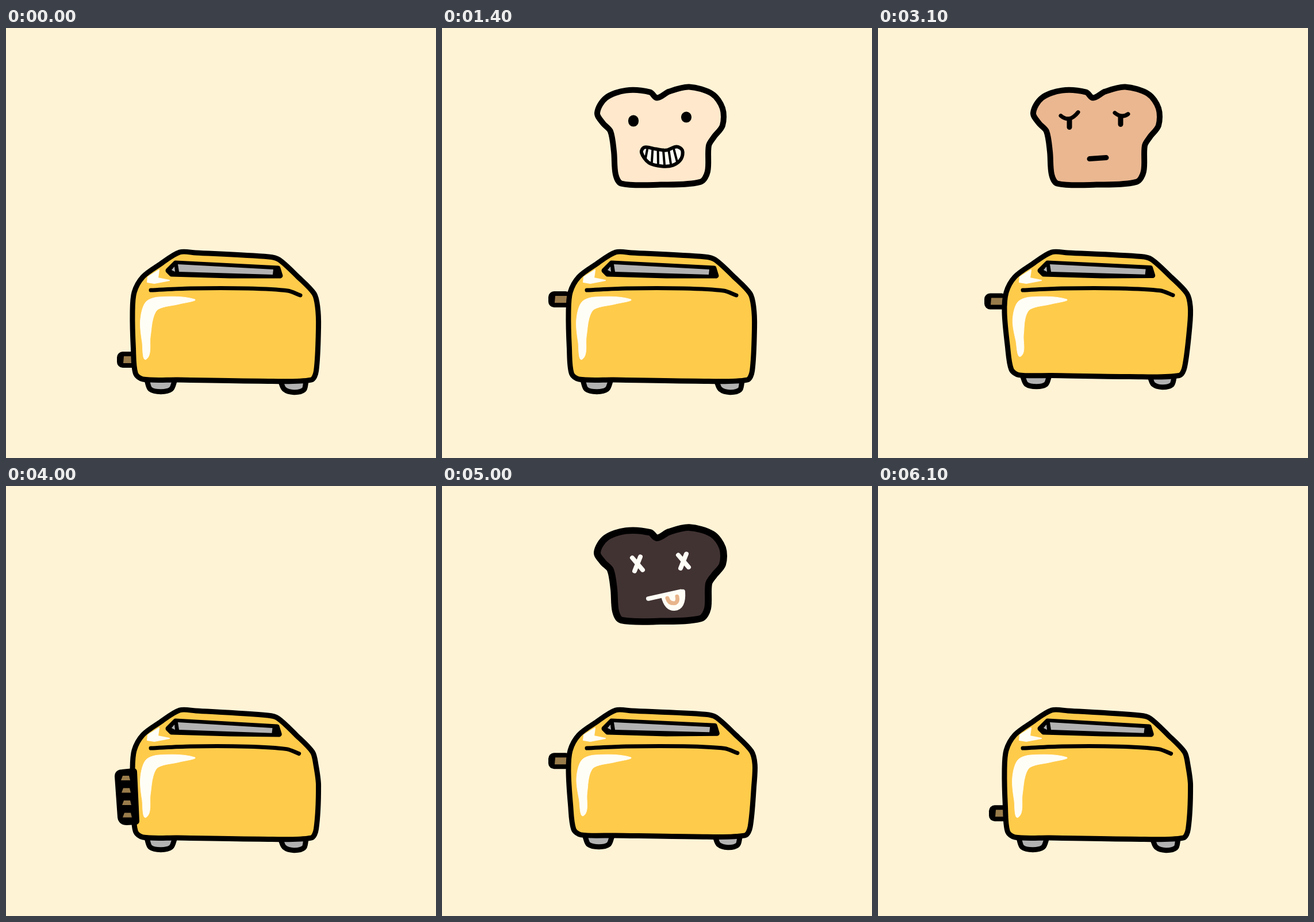
Recreate the animation shown at these times as an HTML page with a canvas. Size 748 by 748 pixels, loop 6.2 s.

```html
<!DOCTYPE html>
<html lang="en">
<head>
<meta charset="utf-8">
<title>Toaster</title>
<style>
  html, body { margin: 0; width: 100%; height: 100%; overflow: hidden; background: #fff3d6; }
  canvas { display: block; }
</style>
</head>
<body>
<canvas id="stage" width="748" height="748"></canvas>
<script>
const ctx = document.getElementById('stage').getContext('2d');
const FRAME = 100, FRAMES = 62, CYCLE = 17, FIRST_POP = 12, TAKES = 7;
const AIR_BEATS = 11, PRESS_BEAT = 11;
const BLACK = '#000', CREAM = '#fff3d6', YELLOW = '#ffcb4a', GREY = '#b2b2b2', BROWN = '#997c4b', WHITE = '#fffef6';

const points = text => text.split(' ').map(pair => pair.split(',').map(Number));

const body = points('268,411 302,390 330,391 457,398 475,403 507,432 536,462 542,485 543,520 537,594 528,609 440,611 300,609 241,608 228,598 223,555 220,495 223,460 238,433');
const slot = points('282,422 295,409 473,418 477,431 390,431 288,428');
const gap = points('299,411 465,420 464,429 301,424');
const crease = points('252,456 320,453 420,453 490,457 512,465');
const shine = points('328,472 266,468 243,477 234,508 238,545 246,574 252,535 256,505 265,489 302,480');
const glint = points('266,421 247,433 246,442 258,444 284,439 264,435');
const leftFoot = points('248,611 254,625 272,629 289,625 295,611');
const rightFoot = points('476,612 482,625 498,630 515,626 519,613');
const crust = points('374,122 362,112 320,109 285,122 270,148 280,166 293,180 299,215 302,255 312,271 380,273 450,268 462,250 464,205 473,190 488,170 488,140 470,115 430,103 395,111');
const grin = points('347,217 352,208 372,211 390,213 408,207 418,213 416,228 402,239 383,241 360,235');

function polygon(p) {
  const path = new Path2D();
  p.forEach(([x, y]) => path.lineTo(x, y));
  path.closePath();
  return path;
}

function smooth(p, closed = true) {
  const n = p.length, path = new Path2D();
  const at = i => closed ? p[(i + n) % n] : p[Math.max(0, Math.min(n - 1, i))];
  const heading = i => {
    const [ax, ay] = at(i - 1), [bx, by] = at(i + 1), d = Math.hypot(bx - ax, by - ay);
    return [(bx - ax) / d, (by - ay) / d];
  };
  path.moveTo(...p[0]);
  for (let i = 0; i < n - !closed; i++) {
    const [ax, ay] = at(i), [bx, by] = at(i + 1), [ux, uy] = heading(i), [vx, vy] = heading(i + 1);
    const h = Math.hypot(bx - ax, by - ay) * 0.3;
    path.bezierCurveTo(ax + ux * h, ay + uy * h, bx - vx * h, by - vy * h, bx, by);
  }
  return path;
}

function ink(path, width, fill, color = BLACK) {
  if (typeof path === 'string') path = new Path2D(path);
  if (fill) { ctx.fillStyle = fill; ctx.fill(path); }
  if (width) { ctx.lineWidth = width; ctx.strokeStyle = color; ctx.stroke(path); }
}

// Redrawn-line wobble: the base spreads and sinks while the top right sways
function wobble(take) {
  const turn = 2 * Math.PI / TAKES, spread = Math.cos((take + 1) * turn), sway = Math.sin(take * turn);
  const warp = p => p.map(([x, y]) => {
    const u = (x - 383) / 160, v = (y - 500) / 110;
    if (v > 0) return [x + 5 * spread * u * v, y + 5 * spread * v];
    return u > 0 ? [x + 3 * sway * u, y + 2.5 * sway * u * v] : [x, y];
  });
  return { warp, sway };
}

function drawLever(x, y) {
  const shaft = new Path2D();
  shaft.roundRect(x, y - 14, 40, 28, 10);
  ink(shaft, 0, BLACK);
  ink(`M${x + 12} ${y - 6}h20v12h-21z`, 0, BROWN);
}

function drawLeverBlur() {
  ink('M195 505Q195 499 202 499L222 497L226 583L210 584Q201 584 200 576Z', 12, BLACK);
  for (let i = 0; i < 4; i++) ink(`M${203 + i} ${504 + 21.5 * i}h11l2 8h-16z`, 0, BROWN);
}

function drawToaster(beat, take) {
  const { warp, sway } = wobble(take);
  for (const foot of [leftFoot, rightFoot]) ink(smooth(warp(foot), false), 9, GREY);
  if (beat < PRESS_BEAT) drawLever(185, 472 + 8 * sway);
  if (beat > PRESS_BEAT) drawLever(193, 577 + 8 * sway);
  ink(smooth(warp(body)), 9, YELLOW);
  if (beat === PRESS_BEAT) drawLeverBlur();
  ink(polygon(warp(slot)), 9, BLACK);
  ink(polygon(warp(gap)), 0, GREY);
  ink('M288 421L293 415L294 424Z', 0, GREY);
  ink(smooth(warp(crease), false), 7);
  ink(smooth(warp(shine)), 1, WHITE, WHITE);
  ink(polygon(warp(glint)), 2, WHITE, WHITE);
}

function happyFace() {
  ink('M333 161V163M425 155V156', 18);
  ink(smooth(grin), 6, WHITE);
  for (let i = 0; i < 6; i++) ink(`M${357 + 9.3 * i} 212L${354 + 11 * i} ${238 - 1.2 * (i - 3) ** 2}`, 4);
}

function tiredFace() {
  ink('M318 153Q333 166 348 147M412 148Q424 158 435 150', 7);
  ink('M333 161V173M422 156V168M368 228L397 226', 9);
}

function deadFace() {
  for (const [x, y] of [[340, 169], [420, 164]]) {
    ink(`M${x - 9} ${y - 11}l18 22M${x + 5} ${y - 13}l-10 26`, 8, null, WHITE);
  }
  ink('M359 232L415 219', 8, null, WHITE);
  ink('M385 227Q390 250 404 250Q421 249 419 219Z', 8, WHITE, WHITE);
  ink('M392 231Q395 242 406 240Q411 237 409 228', 7, null, '#e8b58c');
}

const slices = [
  { color: '#ffe8cb', width: 10, face: happyFace },
  { color: '#eab790', width: 10, face: tiredFace },
  { color: '#423333', width: 12, face: deadFace }
];

// Quick launch that eases out, then an accelerating drop
function toastTop(beat) {
  return 62 + 238 * (Math.exp(-0.95 * beat) + Math.max(0, (beat - 5) / 5) ** 3.2);
}

function drawToast({ color, width, face }, beat) {
  ctx.save();
  ctx.beginPath();
  ctx.rect(0, 0, 748, 428);
  ctx.clip();
  ctx.translate(0, toastTop(beat));
  ctx.scale(1, beat < 4 ? 1 : 0.96);
  ctx.translate(0, -98);
  ink(smooth(crust), width, color);
  face();
  ctx.restore();
}

function draw(now) {
  const n = Math.floor(now / FRAME) % FRAMES;
  const beat = ((n || FRAMES) + CYCLE - FIRST_POP) % CYCLE;
  ctx.fillStyle = CREAM;
  ctx.fillRect(0, 0, 748, 748);
  drawToaster(beat, n % TAKES);
  if (n >= FIRST_POP && beat < AIR_BEATS) drawToast(slices[Math.floor((n - FIRST_POP) / CYCLE)], beat);
}

ctx.lineCap = ctx.lineJoin = 'round';
(function loop() {
  draw(performance.now());
  requestAnimationFrame(loop);
})();
</script>
</body>
</html>
```
